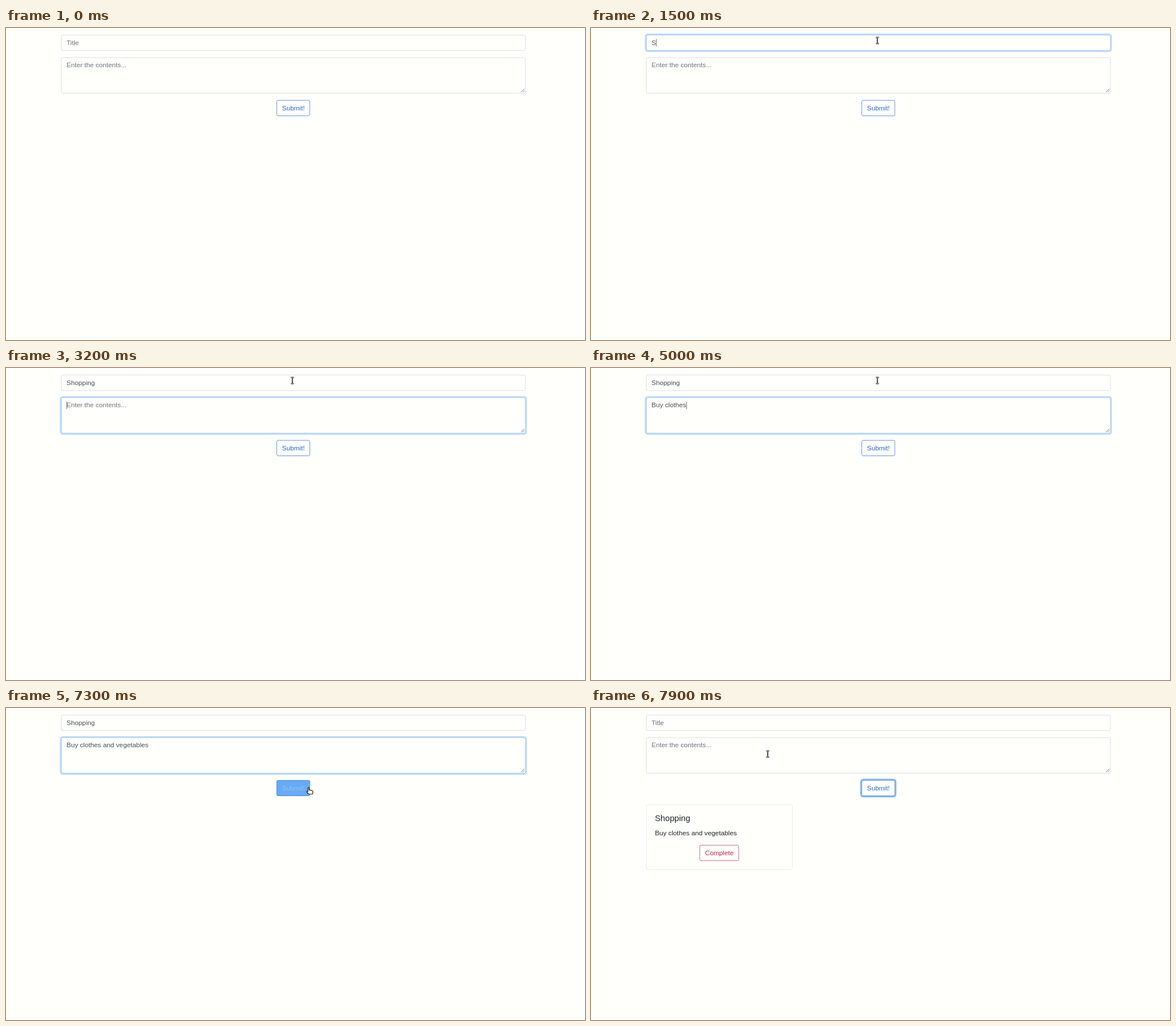
An HTML page that plays this animation: 1019x549 px, repeating every 8 s.

```html
<!DOCTYPE html>
<html lang="en">
<head>
<meta charset="utf-8">
<style>
html, body { margin: 0; width: 100%; height: 100%; overflow: hidden; background: #fffffc; }
#page {
  position: absolute; left: 97px; top: 11.6px; width: 1110px; height: 400px;
  transform: scale(.7365); transform-origin: 0 0;
  font: 16px/24px "Liberation Sans", Arial, sans-serif; color: #212529;
}
#page * { box-sizing: border-box; }
.field, .btn, #card { position: absolute; border: 1px solid #ced4da; border-radius: 4px; }
.field { left: 0; width: 1110px; padding: 6px 12px; color: #495057; white-space: pre; }
#title { top: 0; height: 38px; }
#body { top: 54px; height: 86px; }
.hint { color: #6c757d; }
.caret {
  display: inline-block; width: 1.3px; height: 18px; margin-right: -1.3px;
  vertical-align: -3.5px; background: #333;
}
#grip { position: absolute; right: 1px; bottom: 1px; stroke: #555; stroke-width: 1.1; }
.btn { height: 38px; padding: 6px 12px; transform: translateX(-50%); white-space: nowrap; }
#submit { left: 555px; top: 156px; }
#card { left: 0; top: 214px; width: 350px; height: 156px; padding: 20px; border-color: rgba(0,0,0,.125); }
#card h5 { margin: 0 0 12px; font-size: 20px; font-weight: 400; line-height: 24px; }
#card p { margin: 0; }
#card .btn { left: 174px; top: 96px; color: #b52d4d; border-color: #b83c58; }
#pointer { position: absolute; left: 0; top: 0; overflow: visible; }
</style>
</head>
<body>
<div id="page">
  <div id="title" class="field"><span class="text"></span><i class="caret"></i><span class="hint">Title</span></div>
  <div id="body" class="field"><span class="text"></span><i class="caret"></i><span class="hint">Enter the contents...</span>
    <svg id="grip" width="10" height="10"><path d="M1 9L9 1M5.5 9L9 5.5"/></svg></div>
  <div id="submit" class="btn">Submit!</div>
  <div id="card"><h5>Shopping</h5><p>Buy clothes and vegetables</p><div class="btn">Complete</div></div>
</div>
<svg id="pointer" width="1" height="1" stroke-linejoin="round">
  <g id="beam" fill="none"><path d="M-2.6-5.5H2.6M0-5.5V5.5M-2.6 5.5H2.6" stroke="#222" stroke-width="2.2"/>
    <path d="M-2.4-5.5H2.4M0-5.5V5.5M-2.4 5.5H2.4" stroke="#ddd" stroke-width=".6"/></g>
  <path id="arrow" d="M0 0V12L2.8 9.4L4.7 13.5L6.6 12.6L4.8 8.7H8.6Z" fill="#fff" stroke="#222"/>
  <path id="hand" d="M-2.5-5.5Q-1.5-6.5-.5-5.5V-1.8L4.5-.8Q6.3-.2 6.2 1.5L5.3 5.5H-1.5L-4.8 1.5Q-4.8 0-2.5 1Z" fill="#fff" stroke="#222" stroke-width="1.2"/>
</svg>
<script>
const LOOP = 8000, STEP = 100;
const $ = id => document.getElementById(id);

// Keystrokes: time, characters typed so far
const titleKeys = [[800, 0], [1500, 1], [1800, 2], [2000, 4], [2100, 5], [2300, 6], [2400, 7], [2500, 8]];
const bodyKeys = [[2900, 0], [3400, 1], [3600, 2], [3700, 3], [3900, 4], [4300, 5], [4400, 6], [4600, 7],
  [4800, 9], [5000, 11], [5100, 12], [5200, 13], [5500, 15], [5600, 17], [5700, 18], [5900, 20],
  [6100, 21], [6200, 22], [6300, 23], [6400, 24], [6600, 25], [6700, 26]];

// Focus ring strength
const titleRing = [[800, .6], [1000, 1], [3000, .45], [3200, 0]];
const bodyRing = [[3000, .5], [3200, 1], [7400, .4], [7500, 0]];
const submitRing = [[7400, .6], [7500, 1]];

// Submit button: background, text, border
const plain = ["transparent", "#2868c4", "#3470c8"];
const solid = ["#1a78ee", "#fff", "#1a6fdc"];
const submitLook = [[0, plain], [7300, ["#69aaf5", "#8fc2f9", "#2c72d2"]], [7400, solid], [7700, plain]];

// Pointer: time, x, y, shape
const moves = [[400, 530, 3, "arrow"], [500, 518, 10, "arrow"], [600, 508, 19, "beam"], [700, 504, 22, "beam"],
  [7100, 519, 62, "beam"], [7200, 532, 118, "arrow"], [7300, 534, 146, "hand"], [7400, 526, 145, "hand"],
  [7600, 510, 142, "hand"], [7700, 440, 118, "arrow"], [7800, 355, 92, "beam"], [7900, 311, 81, "beam"]];

const SENT = 7500;

const last = (list, t) => list.filter(e => e[0] <= t).pop();
const value = (list, t) => (last(list, t) || [0, 0])[1];

function ring(el, k, alpha) {
  el.style.boxShadow = k ? `0 0 0 ${3.2 * k}px rgba(20,115,235,${alpha * k})` : "none";
}

function drawField(id, text, keys, rings, blur, t) {
  const el = $(id), key = last(keys, t);
  const shown = key && t < SENT ? text.slice(0, key[1]) : "";
  const caret = key && t < blur && (t - key[0]) % 1000 < 500;
  el.querySelector(".text").textContent = shown;
  el.querySelector(".hint").style.display = shown ? "none" : "";
  el.querySelector(".caret").style.display = caret ? "" : "none";
  const k = value(rings, t);
  el.style.borderColor = `color-mix(in srgb, #80b4ee ${k * 100}%, #ced4da)`;
  ring(el, k, .25);
}

function draw(t) {
  drawField("title", "Shopping", titleKeys, titleRing, 2900, t);
  drawField("body", "Buy clothes and vegetables", bodyKeys, bodyRing, 7400, t);

  const submit = $("submit"), [fill, ink, edge] = value(submitLook, t);
  submit.style.background = fill;
  submit.style.color = ink;
  submit.style.borderColor = edge;
  ring(submit, value(submitRing, t), .5);

  $("card").style.display = t >= SENT ? "" : "none";

  const at = last(moves, t);
  $("pointer").style.display = at ? "" : "none";
  if (!at) return;
  $("pointer").style.transform = `translate(${at[1]}px, ${at[2]}px)`;
  for (const shape of ["beam", "arrow", "hand"]) $(shape).style.display = shape === at[3] ? "" : "none";
}

const start = performance.now();
function tick() {
  const t = (performance.now() - start) % LOOP;
  draw(Math.floor(t / STEP) * STEP);
  requestAnimationFrame(tick);
}
tick();
</script>
</body>
</html>
```
